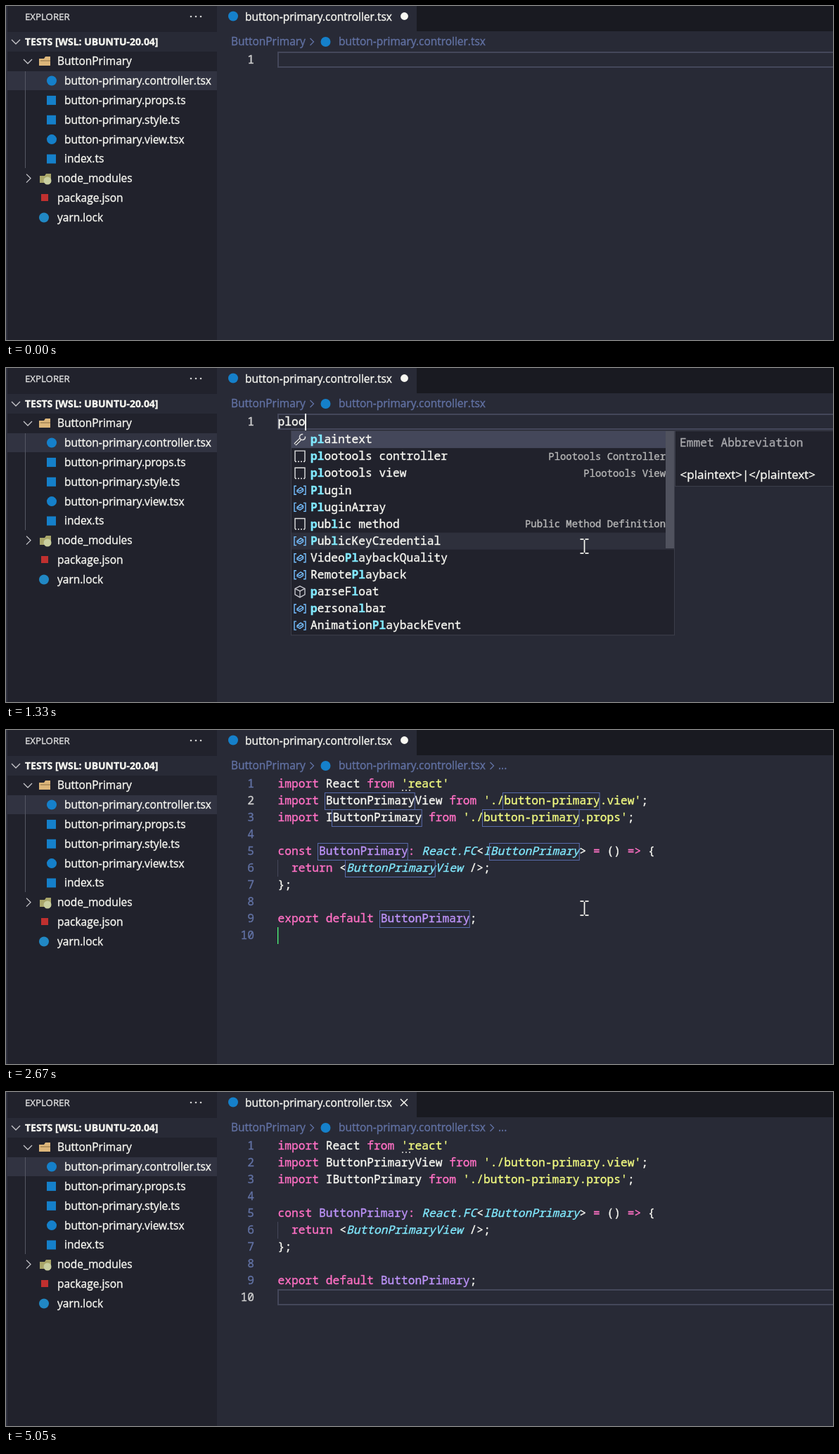
An HTML page with a canvas that plays this animation: 1176 by 476 pixels, repeating every 5.19 s.

```html
<!DOCTYPE html>
<html lang="en">
<head>
<meta charset="utf-8">
<title>Snippet in a code editor</title>
<style>
html, body { margin: 0; width: 100%; height: 100%; overflow: hidden; background: #282a36; }
canvas { display: block; }
</style>
</head>
<body>
<canvas id="stage" width="1176" height="476"></canvas>
<script>
const ctx = document.getElementById('stage').getContext('2d');
const LOOP = 5190;
const BG = '#282a36', SIDE = '#21222c', BAR = '#191a21', SEL = '#44475a', ROW = '#313341';
const FG = '#f8f8f2', DIM = '#6272a4', PINK = '#ff70c4', YELLOW = '#f1fa80', CYAN = '#80e8fd';
const GREEN = '#50fa7b', ORANGE = '#ffb86c', PURPLE = '#bd93f9', RED = '#ff5555', BLUE = '#1580ca';
const UI = '15.48px "Open Sans", sans-serif';
const MONO = '16.25px "Noto Sans Mono", "DejaVu Sans Mono", monospace';
const CH = 9.75, LEFT = 386.5, TOP = 64.5, PITCH = 24.1;

const colX = c => LEFT + c * CH;
const lineY = n => Math.round(TOP + (n - 1) * PITCH);
const baseY = n => lineY(n) + 17;
const within = (t, a, b) => t >= a && t < b;

function rect(x, y, w, h, color) {
  ctx.fillStyle = color;
  ctx.fillRect(x, y, w, h);
}
function frame(x, y, w, h, color, width = 1) {
  ctx.strokeStyle = color;
  ctx.lineWidth = width;
  ctx.strokeRect(x, y, w, h);
}
function dot(x, y, r, color) {
  ctx.fillStyle = color;
  ctx.beginPath();
  ctx.arc(x, y, r, 0, 7);
  ctx.fill();
}
// A hairline stroke gives the slightly heavier screen weight.
function text(s, x, y, color = FG, font = UI, align = 'left') {
  ctx.font = font;
  ctx.fillStyle = ctx.strokeStyle = color;
  ctx.textAlign = align;
  ctx.lineWidth = 0.35;
  ctx.fillText(s, x, Math.round(y));
  ctx.strokeText(s, x, Math.round(y));
}
function path(points, color, width = 1.3, close = false) {
  ctx.strokeStyle = color;
  ctx.lineWidth = width;
  ctx.beginPath();
  points.forEach(([x, y], i) => i ? ctx.lineTo(x, y) : ctx.moveTo(x, y));
  if (close) ctx.closePath();
  ctx.stroke();
}
const chevronDown = (x, y) => path([[x - 6, y - 3], [x, y + 3], [x + 6, y - 3]], '#c8c8cc');
const chevronRight = (x, y, color = '#c8c8cc', k = 6) =>
  path([[x - k / 2, y - k], [x + k / 2, y], [x - k / 2, y + k]], color);

function folder(x, y, color) {
  ctx.fillStyle = color;
  ctx.beginPath();
  for (const [dx, dy] of [[1, 4], [8, 4], [10, 1], [17, 1], [17, 14], [1, 14]]) ctx.lineTo(x + dx, y + dy);
  ctx.fill();
}

// ---- sidebar ----
const rowY = i => 78.7 + i * 27.85;
const FILES = ['button-primary.controller.tsx', 'button-primary.props.ts', 'button-primary.style.ts',
  'button-primary.view.tsx', 'index.ts'];

function sidebar(bad) {
  rect(0, 0, 300, 476, SIDE);
  rect(0, 0, 2, 476, '#303240');
  text('EXPLORER', 27, 20, '#e0e0e0', '13.25px "Open Sans", sans-serif');
  for (const x of [263, 270, 277]) dot(x, 15, 1.3, '#d0d0d0');
  rect(2, 37, 298, 28, BG);
  chevronDown(14, 51);
  text('TESTS [WSL: UBUNTU-20.04]', 27, 56, FG, 'bold 13.95px "Open Sans", sans-serif');

  rect(2, 93, 298, 27, ROW);
  rect(27, 93, 1, 138, '#555763');
  chevronDown(31, 79);
  folder(46, 71, '#dcb67a');
  path([[49, 78], [63, 78]], '#8a6f42', 1);
  text('ButtonPrimary', 73, 84, bad ? RED : FG);
  if (bad) dot(273, 78.5, 5, '#8f3c44');
  FILES.forEach((name, i) => {
    const y = rowY(i + 1);
    if (name.endsWith('.tsx')) dot(65, y, 7, BLUE);
    else rect(58, y - 6.5, 13, 13, BLUE);
    const cut = bad && i === 0;
    text(cut ? 'button-primary.controll...' : name, 83, y + 5.5, cut ? RED : FG);
    if (cut) text('1', 272, y + 5.5, RED);
  });
  chevronRight(32, 245.6);
  folder(47, 238, '#a9a66a');
  dot(59, 249, 5.5, '#c9cfa0');
  text('node_modules', 73, rowY(6) + 5.5);
  rect(50, 268, 10, 10, '#c0302f');
  text('package.json', 73, rowY(7) + 5.5);
  dot(54, 301.5, 7, '#2188c4');
  text('yarn.lock', 73, rowY(8) + 5.5);
}

// ---- tab and breadcrumb ----
function header(bad, saved, more) {
  rect(300, 0, 876, 36, BAR);
  rect(300, 0, bad ? 297 : 284, 36, BG);
  dot(323, 14.5, 7, BLUE);
  text(FILES[0] + (bad ? ' 1' : ''), 340, 21, bad ? RED : FG);
  if (saved) {
    path([[561, 10], [571, 20]], FG, 1.5);
    path([[571, 10], [561, 20]], FG, 1.5);
  } else dot(bad ? 578.5 : 566.5, 14.5, 5.4, FG);

  text('ButtonPrimary', 320, 56, DIM);
  chevronRight(435, 51, DIM, 5);
  dot(454.5, 51, 7, BLUE);
  text(FILES[0], 473, 56, DIM);
  if (more) {
    chevronRight(691, 51, DIM, 5);
    text('...', 700, 56, DIM);
  }
}

// ---- code ----
function code(settled) {
  const name = settled ? PURPLE : FG;
  return [
    [['import', PINK], [' React '], ['from', PINK], [" 'react'", YELLOW]],
    [['import', PINK], [' ButtonPrimaryView '], ['from', PINK], [" './button-primary.view'", YELLOW], [';']],
    [['import', PINK], [' IButtonPrimary '], ['from', PINK], [" './button-primary.props'", YELLOW], [';']],
    [],
    [['const ', PINK], ['ButtonPrimary', settled ? PURPLE : GREEN], [': ', PINK], ['React.FC', CYAN, 1], ['<'],
      ['IButtonPrimary', settled ? CYAN : ORANGE, 1], ['> '], ['= ', PINK], ['() '], ['=> ', PINK], ['{']],
    [['  return ', PINK], ['<'], ['ButtonPrimaryView', CYAN, 1], [' />;']],
    [['};']],
    [],
    [['export default ', PINK], ['ButtonPrimary', name], [';']],
    []
  ];
}
function codeLine(tokens, x, y) {
  for (const [s, color = FG, slant] of tokens) {
    text(s, x, y, color, (slant ? 'italic ' : '') + MONO);
    x += s.length * CH;
  }
}
function lineNumber(n, active) {
  text(n, 353, baseY(n), active ? '#d0d0d0' : DIM, MONO, 'right');
}
const currentLine = n => {
  rect(386, lineY(n), 790, 2, SEL);
  rect(386, lineY(n) + 21, 790, 2, SEL);
  rect(386, lineY(n), 2, 23, SEL);
};
const caret = (n, col, color = FG) => rect(Math.round(colX(col)) - 1, lineY(n), 2, 24, color);

function squiggle() {
  const pts = [];
  for (let x = 387; x <= 426; x += 3) pts.push([x, pts.length % 2 ? 84.5 : 88]);
  path(pts, RED, 1.2);
}

// line, first column, length, caret at the end
const STOPS = [[2, 7, 13, 1], [2, 33, 14, 0], [3, 8, 13, 1], [3, 30, 14, 0],
  [5, 6, 13, 1], [5, 31, 13, 1], [6, 10, 13, 1], [9, 15, 13, 1]];

function editor(t) {
  const stops = t < 2870, active = stops ? 2 : t < 3550 ? 8 : 10;
  if (!stops) currentLine(active);
  for (let n = 1; n <= 10; n++) lineNumber(n, n === active);
  rect(386, lineY(6), 1, 24, SEL);
  code(t >= 2470).forEach((tokens, i) => codeLine(tokens, LEFT, baseY(i + 1)));
  if (t < 2330) squiggle();
  else for (const x of [563, 568, 573]) rect(x, 85, 2, 2, '#b0b0b0');
  if (stops) {
    for (const [n, c, len, end] of STOPS) {
      frame(Math.round(colX(c)) - 1.5, lineY(n) + 0.5, len * CH + 1, 24, '#586bab');
      if (end && t < 2570) caret(n, c + len);
    }
    rect(386, lineY(10), 1.3, 24, GREEN);
  } else if (t < 3350) caret(8, 0);
  else if (within(t, 3550, 4040) || within(t, 4590, 5050)) caret(10, 0);
}

// ---- suggestions ----
const ICONS = {
  w(x, y) {
    path([[x - 7, y + 7], [x + 1, y - 1]], '#e0e0e0', 4.5);
    path([[x - 6.5, y + 6.5], [x + 1, y - 1]], SIDE, 1.6);
    ctx.strokeStyle = '#e0e0e0';
    ctx.lineWidth = 1.6;
    ctx.beginPath();
    ctx.arc(x + 3.5, y - 3.5, 4, -0.2, 4.9);
    ctx.stroke();
  },
  k(x, y) {
    [[-8, 10], [4, 4], [-8, 5], [-1, 8], [-8, 16], [-8, 9]].forEach(([dx, w], i) =>
      rect(x + dx, y + [-7, -7, -3, -3, 2, 6][i], w, 1.8, '#e0e0e0'));
  },
  v(x, y) {
    for (const s of [-1, 1]) path([[x + s * 5, y - 6], [x + s * 8, y - 6], [x + s * 8, y + 6], [x + s * 5, y + 6]], '#75beff', 1.4);
    path([[x - 4, y], [x + 1, y - 4], [x + 4.5, y - 2], [x + 4.5, y + 1], [x, y + 4], [x - 4, y + 2]], '#75beff', 1.4, true);
    path([[x - 4, y], [x, y + 1], [x + 4.5, y - 2]], '#75beff', 1.2);
  },
  m(x, y, color = '#b180d7') {
    path([[x, y - 8], [x + 7, y - 4.5], [x + 7, y + 4], [x, y + 8], [x - 7, y + 4], [x - 7, y - 4.5]], color, 1.4, true);
    path([[x - 7, y - 4.5], [x, y - 1], [x + 7, y - 4.5]], color, 1.3);
    path([[x, y - 1], [x, y + 8]], color, 1.3);
  },
  g(x, y) { ICONS.m(x, y, '#c5c5cc'); },
  s(x, y) {
    path([[x - 7, y + 7], [x - 7, y - 8], [x + 7, y - 8], [x + 7, y + 7]], '#e0e0e0', 1.4);
    for (let dx = -7; dx < 7; dx += 4) rect(x + dx, y + 6.5, 2, 1.5, '#e0e0e0');
  }
};
const CONTROLLER = 's plootools controller|Plootools Controller', VIEW = 's plootools view|Plootools View';
const LIST_P = ['w p', 'k package', 'v parent', 'm parseFloat', 'm parseInt', 'v performance', 'v personalbar',
  'm postMessage', 'm print', 'm prompt', 'w param', 'w pic'];
const LIST_PL = ['w plaintext', CONTROLLER, VIEW, 'v Plugin', 'v PluginArray',
  's public method|Public Method Definition', 'v PublicKeyCredential', 'v VideoPlaybackQuality',
  'v RemotePlayback', 'g parseFloat', 'v personalbar', 'v AnimationPlaybackEvent'];

function label(s, query, x, y) {
  const low = s.toLowerCase();
  const hits = new Set();
  let from = Math.max(low.indexOf(query), 0);
  for (const q of query) {
    const i = low.indexOf(q, from);
    hits.add(i);
    from = i + 1;
  }
  [...s].forEach((c, i) => text(c, x + i * CH, y, hits.has(i) ? CYAN : FG, (hits.has(i) ? 'bold ' : '') + MONO));
}

function suggest(list, query, x, barH, barColor) {
  const h = list.length * PITCH + 2;
  rect(x, 89, 545, h, SIDE);
  rect(x, 90, 545, PITCH, SEL);
  if (list.length > 6) rect(x, 90 + 6 * PITCH, 545, PITCH, '#2e303c');
  list.forEach((item, i) => {
    const y = 102 + i * PITCH;
    const [name, note] = item.slice(2).split('|');
    ICONS[item[0]](x + 13, y);
    label(name, query, x + 28, y + 5.2);
    if (note) text(note, x + 533, y + 4.6, '#b8b8b8', '13.9px "Noto Sans Mono", monospace', 'right');
  });
  if (barH) rect(x + 533, 90, 12, barH, barColor);
  frame(x + 0.5, 89.5, 545, h, '#3c3e4a');
}
function details(x, h, title, body) {
  rect(x, 89, 1190 - x, h, SIDE);
  frame(x + 0.5, 89.5, 1190 - x, h, '#3c3e4a');
  text(title, x + 7, 112, '#a8a8ac', MONO);
  if (body) text(body, x + 7.5, 158, FG, '17px "Open Sans", sans-serif');
}

function typing(t) {
  currentLine(1);
  lineNumber(1, true);
  const word = 'ploo'.slice(0, [780, 980, 1180, 1330].filter(s => t >= s).length);
  text(word, LEFT, baseY(1), FG, MONO);
  if (t >= 1470) squiggle();
  if (within(t, 260, 1800)) caret(1, word.length);
  if (within(t, 850, 1050)) {
    suggest(LIST_P, 'p', 397, 40, '#2b2d38');
    details(942, 79, 'Emmet Abbreviation', '<p>|</p>');
  } else if (within(t, 1050, 1400)) {
    suggest(LIST_PL, 'pl', 405, 167, '#50525e');
    details(951, 79, 'Emmet Abbreviation', '<plaintext>|</plaintext>');
  } else if (t >= 1400) {
    suggest([CONTROLLER, VIEW], 'ploo', 405);
    details(951, 295, 'Plootools Controller');
    code(true).forEach((tokens, i) => codeLine(tokens, 959, 157 + i * 23));
  }
}

// ---- mouse ----
const TRACK = [[70, 970, 372], [390, 822.5, 254], [2870, 822.5, 254], [3220, 969.5, 330.5],
  [3420, 969.5, 330.5], [3690, 955.5, 322], [4040, 955.5, 322], [4520, 1027, 434]];

function mouse(t) {
  if (!within(t, 70, 4590)) return;
  let i = 0;
  while (i < TRACK.length - 2 && t >= TRACK[i + 1][0]) i++;
  const [t0, x0, y0] = TRACK[i], [t1, x1, y1] = TRACK[i + 1];
  const k = Math.min(1, (t - t0) / (t1 - t0)), e = k * k * (3 - 2 * k);
  const x = x0 + (x1 - x0) * e, y = y0 + (y1 - y0) * e;
  if (within(t, 850, 1330)) hand(x, y);
  else {
    rect(x - 0.8, y - 9, 1.7, 18, FG);
    for (const s of [-1, 1]) {
      rect(x - 6, y + s * 10 - 0.8, 5, 1.7, FG);
      rect(x + 1, y + s * 10 - 0.8, 5, 1.7, FG);
    }
  }
}
function hand(x, y) {
  ctx.beginPath();
  for (const [dx, dy] of [[-4, 1], [-2.5, -0.5], [-0.5, 1], [0.5, 8], [4, 8], [5, 9], [8, 9.5], [10, 11.5],
    [10, 18], [7.5, 25], [-2, 25], [-5, 20], [-9.5, 15], [-8, 12.5], [-3, 15]]) ctx.lineTo(x + dx, y + dy);
  ctx.closePath();
  ctx.fillStyle = '#fff';
  ctx.fill();
  ctx.strokeStyle = '#15161c';
  ctx.lineWidth = 1;
  ctx.stroke();
}

function draw(now) {
  const t = now % LOOP;
  const bad = within(t, 1470, 2330);
  rect(0, 0, 1176, 476, BG);
  sidebar(bad);
  header(bad, t >= 4040, t >= 2470);
  if (t < 2070) typing(t);
  else editor(t);
  mouse(t);
}

const start = performance.now();
function tick() {
  draw(performance.now() - start);
  requestAnimationFrame(tick);
}
tick();
</script>
</body>
</html>
```
